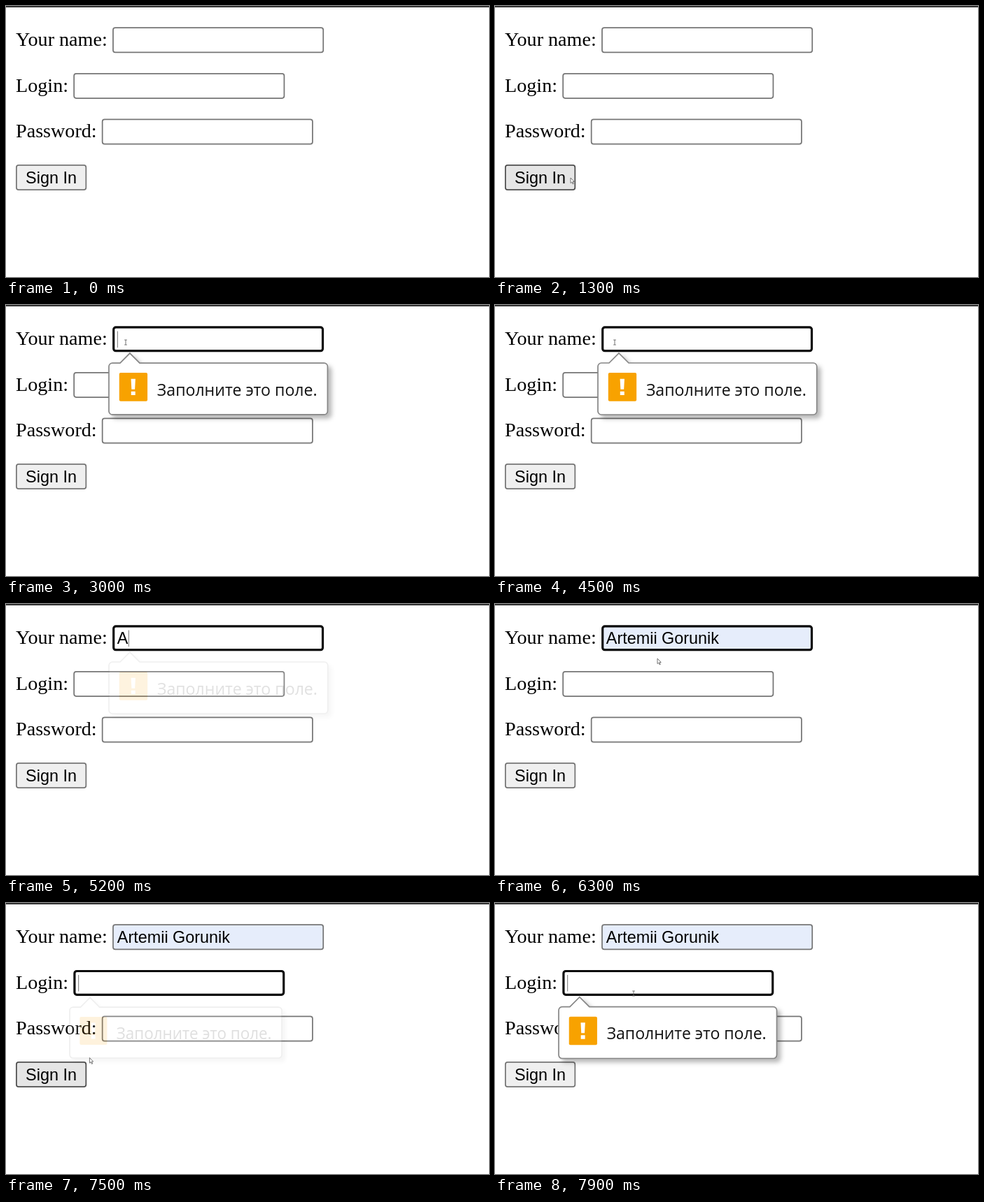
Write an HTML page that moves like this. It is 690 px wide and 388 px high and loops after 8000 ms.

```html
<!DOCTYPE html>
<html lang="en">
<head>
<meta charset="utf-8">
<title>Form validation</title>
<style>
  html, body { margin: 0; width: 100%; height: 100%; overflow: hidden; background: #fff; }
  svg { display: block; width: 100vw; height: 100vh; }
  .label { font: 28.1px "Liberation Serif", "Times New Roman", serif; }
  .ui { font: 23.4px "Liberation Sans", Arial, sans-serif; }
  .tip { font: 23.15px "Open Sans", "Noto Sans", sans-serif; fill: #111; }
  /* borders are drawn inside the outer edge, whatever their width */
  .box {
    --line: 1.75px; --width: 302px;
    x: calc(var(--x) + var(--line) / 2);
    y: calc(var(--y) + var(--line) / 2);
    width: calc(var(--width) - var(--line));
    height: calc(37px - var(--line));
    rx: 3.2px;
    fill: #fff; stroke: #767676; stroke-width: var(--line);
  }
  #name { --x: 152.1px; --y: 30.3px; }
  #login { --x: 96.3px; --y: 95.9px; }
  #password { --x: 136.8px; --y: 161.5px; }
  #button { --x: 14px; --y: 227.1px; --width: 101.2px; fill: #efefef; }
  #name.filled { fill: #e6edfb; }
  .box.focus { --line: 3.2px; stroke: #0a0a0a; }
  #button.hover { fill: #e5e5e5; stroke: #4f4f4f; }
  #button.press { fill: #f5f5f5; stroke: #8d8d8d; }
  .caret { fill: #8c8c8c; }
  .frame { fill: #fff; stroke: #868686; stroke-width: 1.7; filter: drop-shadow(5px 5px 3px rgba(0, 0, 0, .28)); }
  #arrow { fill: #fff; stroke: #666; stroke-width: .9; stroke-linejoin: round; }
  #beam { fill: none; stroke: #666; stroke-width: .9; }
</style>
</head>
<body>
<svg viewBox="0 0 690 388">
  <rect width="690" height="2" fill="#343434"/>

  <g class="label">
    <text x="14.1" y="57">Your name:</text>
    <text x="14.1" y="122.6">Login:</text>
    <text x="14.1" y="188.2">Password:</text>
  </g>

  <rect id="name" class="box"/>
  <rect id="login" class="box"/>
  <rect id="password" class="box"/>
  <rect id="button" class="box"/>
  <text class="ui" x="28.1" y="254">Sign In</text>

  <text id="value" class="ui" x="158.8" y="57.2"></text>
  <rect id="nameCaret" class="caret" y="37.5" width="1.2" height="23.5"/>
  <rect id="loginCaret" class="caret" x="103" y="103" width="1.2" height="23.5"/>

  <!-- local origin: left edge, middle of the bubble's height -->
  <g id="bubble">
    <path class="frame" d="M5 -37H16L30 -51L44 -37H308a5 5 0 0 1 5 5V32a5 5 0 0 1 -5 5H5a5 5 0 0 1 -5 -5V-32a5 5 0 0 1 5 -5Z"/>
    <rect x="14.8" y="-22.9" width="40.4" height="40.6" rx="2" fill="#f8a200"/>
    <path d="M31.6 -14.3H38L37.2 .7H32.4ZM31.8 3.7H37.8V9.1H31.8Z" fill="#fff"/>
    <text class="tip" x="69" y="9.6">Заполните это поле.</text>
  </g>

  <g id="cursor">
    <path id="arrow" d="M0 0V7.6L1.8 6L3.1 8.9L4.3 8.4L3.1 5.5H5.2Z"/>
    <path id="beam" d="M-1.8 0H1.8M0 0V7M-1.8 7H1.8"/>
  </g>
</svg>
<script>
  const LOOP = 8000, STEP = 100;
  const FULL_NAME = "Artemii Gorunik";
  const ENTER = 600, FIRST_SUBMIT = 1900, TYPE = 5100, FILL = 6000, SECOND_SUBMIT = 7400;

  const $ = id => document.getElementById(id);
  const within = (t, a, b) => t >= a && t < b;
  const show = (el, on) => { el.style.display = on ? "" : "none"; };

  // pointer stops, and the curved, eased moves that link them
  const OUTSIDE = [628, 254], SUBMIT = [108, 246], NAME = [171, 50], BELOW = [232, 78], LOGIN = [198, 126];
  const moves = [
    { start: ENTER, end: 1100, from: OUTSIDE, bend: [368, 375], to: SUBMIT },
    { start: 2000, end: 2900, from: SUBMIT, bend: [150, 150], to: NAME },
    { start: 5900, end: 6300, from: NAME, bend: [205, 60], to: BELOW },
    { start: 6600, end: 7200, from: BELOW, bend: [190, 170], to: SUBMIT },
    { start: 7360, end: 7900, from: SUBMIT, bend: [140, 170], to: LOGIN }
  ];

  function pointer(t) {
    const m = moves.findLast(move => move.start <= t) || moves[0];
    const u = Math.min(1, Math.max(0, (t - m.start) / (m.end - m.start)));
    const e = u * u * (3 - 2 * u);
    return m.from.map((p, i) => (1 - e) ** 2 * p + 2 * e * (1 - e) * m.bend[i] + e * e * m.to[i]);
  }

  function inside(el, [x, y]) {
    const b = el.getBBox();
    return within(x, b.x, b.x + b.width) && within(y, b.y, b.y + b.height);
  }

  function drawForm(t) {
    const typed = t >= FILL ? FULL_NAME : t >= TYPE ? FULL_NAME[0] : "";
    $("value").textContent = typed;
    $("name").classList.toggle("filled", t >= FILL);
    $("name").classList.toggle("focus", within(t, FIRST_SUBMIT, SECOND_SUBMIT));
    $("login").classList.toggle("focus", t >= SECOND_SUBMIT);

    // the button reacts one step after the pointer
    $("button").classList.toggle("hover", inside($("button"), pointer(t - STEP)));
    $("button").classList.toggle("press", within(t, 1600, FIRST_SUBMIT) || within(t, 7300, SECOND_SUBMIT));

    const blink = within(t, FIRST_SUBMIT, 5000) && Math.floor(t / 500) % 2 === 0;
    show($("nameCaret"), blink || within(t, TYPE, FILL));
    $("nameCaret").setAttribute("x", typed ? 174.8 : 158.8);
    show($("loginCaret"), t >= SECOND_SUBMIT);
  }

  function drawBubble(t) {
    const second = t > SECOND_SUBMIT;
    const age = t - (second ? SECOND_SUBMIT + STEP : FIRST_SUBMIT);
    const on = second || within(t, FIRST_SUBMIT, TYPE + 300);
    show($("bubble"), on);
    if (!on) return;

    const [x, y] = second ? [91, 185.6] : [147, 120];
    const scale = 1 - .032 / (1 + age / 70);
    const fadeIn = 1 - .87 * Math.exp(-age / 35);
    const fadeOut = second ? 1 : Math.min(1, Math.exp((TYPE - STEP - t) / 95));
    $("bubble").setAttribute("transform", `translate(${x} ${y}) scale(${scale} ${(1 + scale) / 2})`);
    $("bubble").style.opacity = fadeIn * fadeOut;
  }

  function drawCursor(t) {
    // typing hides the pointer until it moves again
    show($("cursor"), within(t, ENTER, TYPE) || t >= FILL);
    const spot = pointer(t);
    $("cursor").setAttribute("transform", `translate(${spot})`);
    const field = document.querySelector(".focus");
    const beam = field !== null && inside(field, spot);
    show($("beam"), beam);
    show($("arrow"), !beam);
  }

  const start = performance.now();
  function tick() {
    const now = Math.max(0, performance.now() - start) % LOOP;
    const t = Math.floor(now / STEP) * STEP;
    drawForm(t);
    drawBubble(t);
    drawCursor(t);
    requestAnimationFrame(tick);
  }
  tick();
</script>
</body>
</html>
```
